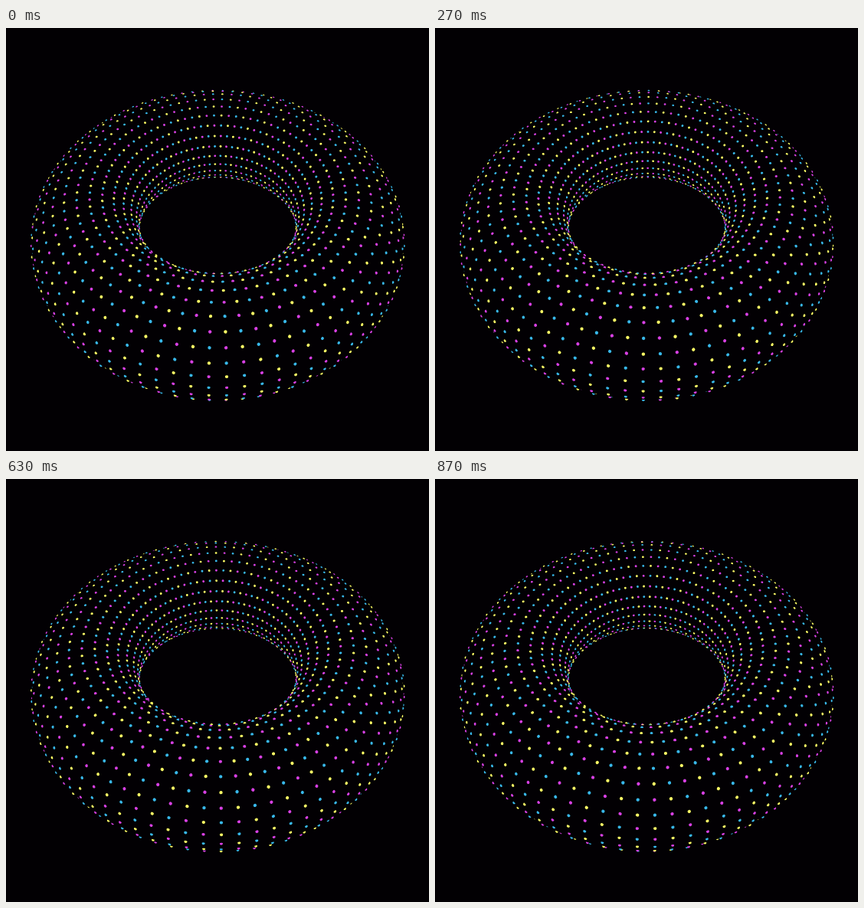
Write an HTML page with a canvas that moves like this. It is 552 px wide and 552 px high and loops after 0.9 s.

```html
<!DOCTYPE html>
<html lang="en">
<head>
<meta charset="utf-8">
<title>Dotted torus</title>
<style>
  html, body { margin: 0; width: 100%; height: 100%; overflow: hidden; background: #020003; }
  canvas { display: block; width: 552px; height: 552px; }
</style>
</head>
<body>
<canvas id="stage" width="552" height="552"></canvas>
<script>
const ctx = document.getElementById('stage').getContext('2d');
const { sin, cos, acos, atan2, hypot, sqrt, floor, PI } = Math;

const SIZE = 552, LOOP = 900, STEP = 30;
const COLUMNS = 84, ROWS = 28;          // dots around the ring, dots around the tube
const TUBE = 0.387, DOT = 0.0094;       // relative to a ring radius of 1
const DIST = 3.68, FOCAL = 617;
const TILT_SIN = 0.755, TILT_COS = 0.656;
const CX = 276.3, CY = 246.5;
const ROW_PHASE = 0.09;
const FIRST_ROW = -6;                   // rows start on the hidden underside
const COLORS = ['#d840e4', '#ffff66', '#38b8ea'];

// Camera space: x right, y down, z away from the eye.
const toCamera = (x, y, z) => [
  x,
  y * TILT_SIN - z * TILT_COS,
  -(y * TILT_COS + z * TILT_SIN)
];

// Each dot is a small ball half sunk into an opaque black torus.
function drawDot(phi, theta, color) {
  const sp = sin(phi), cp = cos(phi), st = sin(theta), ct = cos(theta);
  const ring = 1 + TUBE * ct;
  const [x, y, z] = toCamera(ring * sp, ring * cp, TUBE * st);
  const [nx, ny, nz] = toCamera(sp * ct, cp * ct, st);
  const depth = z + DIST;
  const facing = -(nx * x + ny * y + nz * depth) / hypot(x, y, depth);

  // Just past the limb, only the part above the horizon shows.
  const sunk = TUBE * (1 - sqrt(1 - facing * facing)) / DOT;
  if (facing < 0 && sunk >= 1) return;

  const scale = FOCAL / depth, r = DOT * scale;
  ctx.setTransform(1, 0, 0, 1, CX + x * scale, CY + y * scale);
  ctx.rotate(atan2(ny - y * nz / depth, nx - x * nz / depth));
  ctx.fillStyle = color;
  ctx.beginPath();
  if (facing >= 0) {
    ctx.arc(0, 0, r, -PI / 2, PI / 2);
    ctx.ellipse(0, 0, r * facing, r, 0, PI / 2, 3 * PI / 2);
  } else {
    const half = acos(sunk);
    ctx.arc(0, 0, r, -half, half);
  }
  ctx.fill();
}

// Per loop the dots advance one column around the ring and two rows around the tube.
function draw(t) {
  ctx.setTransform(1, 0, 0, 1, 0, 0);
  ctx.fillStyle = '#020003';
  ctx.fillRect(0, 0, SIZE, SIZE);
  for (let i = 0; i < COLUMNS; i++) {
    const phi = (i + 0.5 + t) * 2 * PI / COLUMNS;
    for (let j = FIRST_ROW; j < FIRST_ROW + ROWS; j++) {
      const theta = (j + ROW_PHASE + 2 * t) * 2 * PI / ROWS;
      drawDot(phi, theta, COLORS[(i + j + 8) % 3]);
    }
  }
}

const start = performance.now();
function tick() {
  const ms = (performance.now() - start) % LOOP;
  draw(floor(ms / STEP) * STEP / LOOP);
  requestAnimationFrame(tick);
}
tick();
</script>
</body>
</html>
```
